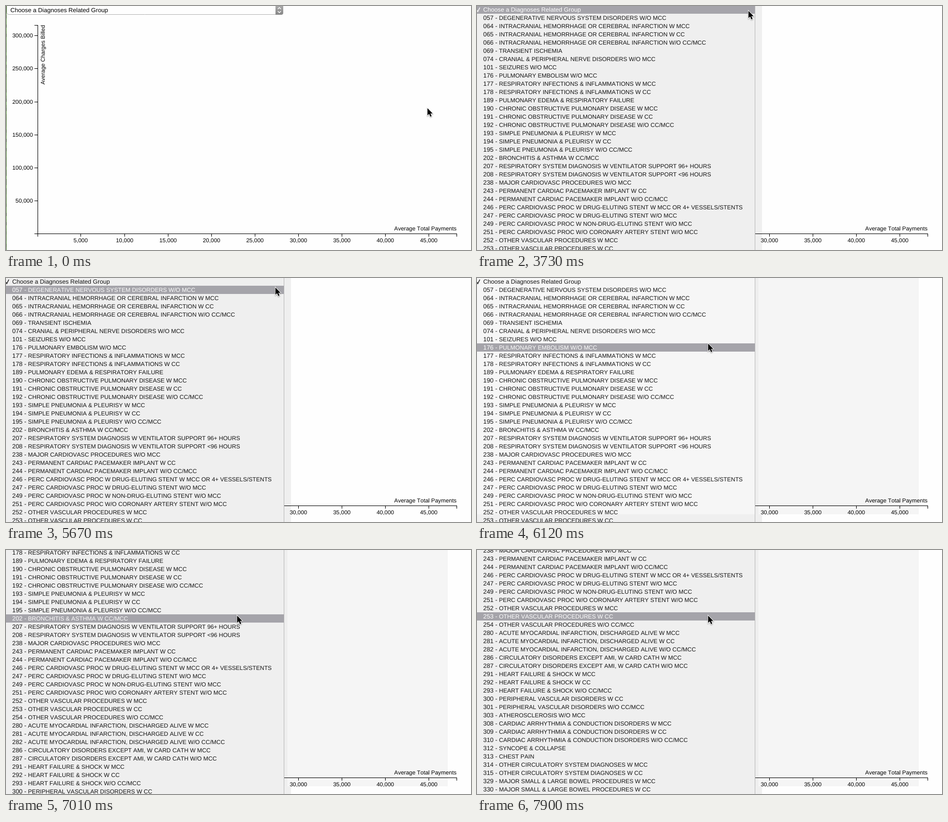
An HTML page with a canvas that plays this animation: 899 px wide and 474 px high, repeating every 8 s.

```html
<!DOCTYPE html>
<html lang="en">
<head>
<meta charset="utf-8">
<title>Diagnosis group chart</title>
<style>
html, body { margin: 0; width: 100%; height: 100%; overflow: hidden; background: #fefefe; }
canvas { display: block; }
</style>
</head>
<body>
<canvas id="stage" width="899" height="474"></canvas>
<script>
const ctx = document.getElementById('stage').getContext('2d');
const W = 899, H = 474, LOOP = 8000;
const FONT = '"Liberation Sans", Arial, sans-serif';
const MENU_OPEN = 2540, TINT = 5830, SCROLL = 6410;
const MENU_W = 537, ROW = 16;

const items = `Choose a Diagnoses Related Group
057 - DEGENERATIVE NERVOUS SYSTEM DISORDERS W/O MCC
064 - INTRACRANIAL HEMORRHAGE OR CEREBRAL INFARCTION W MCC
065 - INTRACRANIAL HEMORRHAGE OR CEREBRAL INFARCTION W CC
066 - INTRACRANIAL HEMORRHAGE OR CEREBRAL INFARCTION W/O CC/MCC
069 - TRANSIENT ISCHEMIA
074 - CRANIAL & PERIPHERAL NERVE DISORDERS W/O MCC
101 - SEIZURES W/O MCC
176 - PULMONARY EMBOLISM W/O MCC
177 - RESPIRATORY INFECTIONS & INFLAMMATIONS W MCC
178 - RESPIRATORY INFECTIONS & INFLAMMATIONS W CC
189 - PULMONARY EDEMA & RESPIRATORY FAILURE
190 - CHRONIC OBSTRUCTIVE PULMONARY DISEASE W MCC
191 - CHRONIC OBSTRUCTIVE PULMONARY DISEASE W CC
192 - CHRONIC OBSTRUCTIVE PULMONARY DISEASE W/O CC/MCC
193 - SIMPLE PNEUMONIA & PLEURISY W MCC
194 - SIMPLE PNEUMONIA & PLEURISY W CC
195 - SIMPLE PNEUMONIA & PLEURISY W/O CC/MCC
202 - BRONCHITIS & ASTHMA W CC/MCC
207 - RESPIRATORY SYSTEM DIAGNOSIS W VENTILATOR SUPPORT 96+ HOURS
208 - RESPIRATORY SYSTEM DIAGNOSIS W VENTILATOR SUPPORT <96 HOURS
238 - MAJOR CARDIOVASC PROCEDURES W/O MCC
243 - PERMANENT CARDIAC PACEMAKER IMPLANT W CC
244 - PERMANENT CARDIAC PACEMAKER IMPLANT W/O CC/MCC
246 - PERC CARDIOVASC PROC W DRUG-ELUTING STENT W MCC OR 4+ VESSELS/STENTS
247 - PERC CARDIOVASC PROC W DRUG-ELUTING STENT W/O MCC
249 - PERC CARDIOVASC PROC W NON-DRUG-ELUTING STENT W/O MCC
251 - PERC CARDIOVASC PROC W/O CORONARY ARTERY STENT W/O MCC
252 - OTHER VASCULAR PROCEDURES W MCC
253 - OTHER VASCULAR PROCEDURES W CC
254 - OTHER VASCULAR PROCEDURES W/O CC/MCC
280 - ACUTE MYOCARDIAL INFARCTION, DISCHARGED ALIVE W MCC
281 - ACUTE MYOCARDIAL INFARCTION, DISCHARGED ALIVE W CC
282 - ACUTE MYOCARDIAL INFARCTION, DISCHARGED ALIVE W/O CC/MCC
286 - CIRCULATORY DISORDERS EXCEPT AMI, W CARD CATH W MCC
287 - CIRCULATORY DISORDERS EXCEPT AMI, W CARD CATH W/O MCC
291 - HEART FAILURE & SHOCK W MCC
292 - HEART FAILURE & SHOCK W CC
293 - HEART FAILURE & SHOCK W/O CC/MCC
300 - PERIPHERAL VASCULAR DISORDERS W CC
301 - PERIPHERAL VASCULAR DISORDERS W/O CC/MCC
303 - ATHEROSCLEROSIS W/O MCC
308 - CARDIAC ARRHYTHMIA & CONDUCTION DISORDERS W MCC
309 - CARDIAC ARRHYTHMIA & CONDUCTION DISORDERS W CC
310 - CARDIAC ARRHYTHMIA & CONDUCTION DISORDERS W/O CC/MCC
312 - SYNCOPE & COLLAPSE
313 - CHEST PAIN
314 - OTHER CIRCULATORY SYSTEM DIAGNOSES W MCC
315 - OTHER CIRCULATORY SYSTEM DIAGNOSES W CC
329 - MAJOR SMALL & LARGE BOWEL PROCEDURES W MCC
330 - MAJOR SMALL & LARGE BOWEL PROCEDURES W CC`.split('\n');

// time, x, y of the pointer tip
const pointer = [
  [0, 814, 198], [600, 772, 184], [750, 706, 157], [900, 656, 135], [1050, 640, 129],
  [1350, 624, 118], [1500, 592, 97], [1650, 560, 76], [1800, 536, 56],
  [1950, 529, 41], [2100, 525, 28], [2250, 523, 16], [2390, 524, 9],
  [4180, 525, 9], [4330, 526, 10],
  [5530, 520, 18], [5680, 500, 45], [5830, 474, 82], [5980, 453, 114], [6120, 446, 127]
];
// time, scroll offset
const scroll = [
  [0, 0], [SCROLL, 36], [6560, 54], [6710, 88], [6860, 126], [7010, 162],
  [7160, 220], [7300, 276], [7450, 324], [7900, 342]
];

const at = (steps, t) => steps.filter(s => s[0] <= t).pop();

function rect(color, x, y, w, h) {
  ctx.fillStyle = color;
  ctx.fillRect(x, y, w, h);
}

function text(str, x, y, size = 11, color = '#000', align = 'left') {
  ctx.font = `${size}px ${FONT}`;
  ctx.fillStyle = color;
  ctx.textAlign = align;
  ctx.fillText(str, x, y);
}

function line(points, color, width) {
  ctx.beginPath();
  points.forEach(([x, y]) => ctx.lineTo(x, y));
  ctx.strokeStyle = color;
  ctx.lineWidth = width;
  ctx.stroke();
}

function drawAxes() {
  rect('#000', 61, 37, 1, 411);
  rect('#000', 55, 37, 6, 1);
  rect('#000', 55, 442, 817, 1);
  rect('#000', 871, 442, 1, 6);
  for (let i = 1; i <= 6; i++) {
    const y = Math.round(442.3 - i * 64.2);
    rect('#000', 55, y, 6, 1);
    text(i * 50 + ',000', 52, y + 4, 11, '#000', 'right');
  }
  for (let i = 1; i <= 9; i++) {
    const x = Math.round(60.3 + i * 84.1);
    rect('#000', x, 442, 1, 6);
    text(i * 5 + ',000', x + .3, 459, 11, '#000', 'center');
  }
  text('Average Total Payments', 871, 436, 11, '#000', 'right');
  ctx.save();
  ctx.translate(75, 37);
  ctx.rotate(-Math.PI / 2);
  text('Average Charges Billed', 0, 0, 11, '#000', 'right');
  ctx.restore();
}

function drawSelect() {
  ctx.beginPath();
  ctx.roundRect(1.5, -8, 534, 24.5, 4);
  ctx.strokeStyle = '#b4b4b4';
  ctx.lineWidth = 1;
  ctx.stroke();
  const g = ctx.createLinearGradient(0, 0, 0, 17);
  g.addColorStop(0, '#a9a9a9');
  g.addColorStop(1, '#868686');
  ctx.fillStyle = g;
  ctx.beginPath();
  ctx.roundRect(521, -8, 15, 25, [0, 0, 4, 0]);
  ctx.fill();
  line([[525.5, 6], [528.5, 3], [531.5, 6]], '#fff', 1.3);
  line([[525.5, 10], [528.5, 13], [531.5, 10]], '#fff', 1.3);
  text(items[0], 8.5, 12, 11.75);
}

function drawEdge() {
  for (let y = 0; y < H; y += 6) {
    const n = Math.sin(y * 1.7) + Math.sin(y * .31);
    rect(`hsl(100 50% ${27 + n * 6}%)`, 0, y, 1, 6);
  }
}

function drawItem(label, y, color) {
  const [code, name] = label.split(' - ');
  if (!name) return text(label, 12, y, 11.75, color);
  text(code + ' -', 12, y, 12, color);
  text(name, 42.5, y, 11.35, color);
}

function drawMenu(t, py) {
  const top = at(scroll, t)[1];
  // the highlight trails the first part of the scroll
  const hover = t >= 6560 && t < 6710 ? 10 : Math.floor((py + top + 1) / ROW);
  rect('#efefef', 0, 0, MENU_W, H);
  if (t >= TINT && t < SCROLL) rect('#f6f6f6', 0, 0, MENU_W, 459);
  items.forEach((label, i) => {
    const y = i * ROW - 1 - top, on = i === hover;
    if (y < -ROW || y > H) return;
    if (on) rect('#a5a4aa', 0, y, MENU_W, ROW);
    drawItem(label, y + 12, on ? '#fff' : '#141414');
    if (!i) line([[0, y + 9], [1.5, y + 12], [5.5, y + 4]], on ? '#fff' : '#111', 1.4);
  });
  rect('#b8b8b8', MENU_W, 0, 1, H);
}

function drawShadow(t) {
  rect('#efefef', MENU_W, 0, 14, H);
  if (t >= TINT) {
    rect('#f5f5f5', MENU_W, 0, 317, 459);
    rect('#eeeeee', MENU_W, 0, 7, 459);
  }
}

const arrow = new Path2D('M0 0V14.2L3.3 11.2L5.6 16.6L8 15.6L5.7 10.3H10Z');

function drawPointer(x, y) {
  ctx.save();
  ctx.translate(x + .8, y + .4);
  ctx.lineJoin = 'miter';
  ctx.strokeStyle = '#fff';
  ctx.lineWidth = 1.8;
  ctx.shadowColor = 'rgba(0,0,0,.4)';
  ctx.shadowBlur = 2;
  ctx.shadowOffsetY = 1;
  ctx.stroke(arrow);
  ctx.shadowColor = 'transparent';
  ctx.fillStyle = '#000';
  ctx.fill(arrow);
  ctx.restore();
}

function draw(t) {
  const open = t >= MENU_OPEN;
  const [, x, y] = at(pointer, t);
  rect('#fefefe', 0, 0, W, H);
  if (open) drawShadow(t);
  drawAxes();
  if (open) {
    drawMenu(t, y);
  } else {
    drawEdge();
    drawSelect();
  }
  drawPointer(x, y);
}

ctx.fontKerning = 'none';
ctx.textRendering = 'geometricPrecision';
const start = performance.now();
function tick() {
  draw((performance.now() - start) % LOOP);
  requestAnimationFrame(tick);
}
tick();
</script>
</body>
</html>
```
